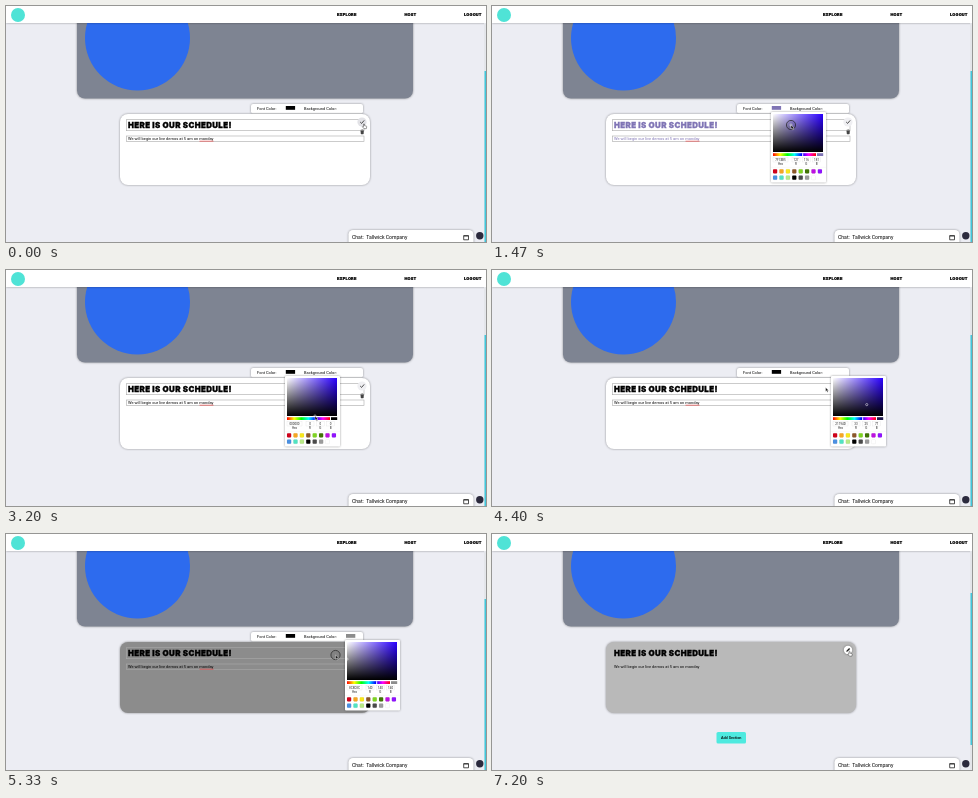
An HTML page that plays this animation: 480x236 px, repeating every 8000 ms.

```html
<!DOCTYPE html>
<html lang="en">
<head>
<meta charset="utf-8">
<title>Schedule editor</title>
<style>
  html, body { margin: 0; width: 100%; height: 100%; overflow: hidden; background: #ecedf3; }
  svg { display: block; width: 100vw; height: 100vh; }
  text { font-family: Roboto, sans-serif; }
  .heavy { font-family: Inter, sans-serif; font-weight: 900; }
  .nav { font-size: 3.9px; letter-spacing: .2px; stroke: #000; stroke-width: .2; }
  .label { font-size: 4px; }
  .raised { filter: drop-shadow(0 .3px 1.3px #0006); }
  .field { fill: none; stroke: #aaa; stroke-width: .6; }
  .line { fill: none; stroke: #222; stroke-width: .8; }
</style>
</head>
<body>
<svg viewBox="0 0 480 236">
  <defs>
    <linearGradient id="white"><stop stop-color="#fff"/><stop offset="1" stop-color="#fff" stop-opacity="0"/></linearGradient>
    <linearGradient id="black" x2="0" y2="1"><stop stop-opacity="0"/><stop offset="1"/></linearGradient>
    <linearGradient id="rainbow"></linearGradient>
  </defs>
  <rect width="480" height="236" fill="#ecedf3"/>

  <rect class="raised" x="71" y="-20" width="336" height="112.5" rx="8" fill="#7e8492"/>
  <circle cx="131.5" cy="32" r="52.5" fill="#2d6bee"/>

  <rect class="raised" width="480" height="17" fill="#fff"/>
  <circle cx="12" cy="9" r="7" fill="#4fe3d6"/>
  <text class="heavy nav" x="331" y="10.1">EXPLORE</text>
  <text class="heavy nav" x="398.5" y="10.1">HOST</text>
  <text class="heavy nav" x="458" y="10.1">LOGOUT</text>

  <g id="toolbar">
    <rect class="raised" x="245" y="98" width="112" height="9.5" rx="2" fill="#fff"/>
    <text class="label" x="251" y="103.8">Font Color:</text>
    <rect id="fontSwatch" x="279.8" y="100" width="9.3" height="3.8"/>
    <text class="label" x="298" y="103.8">Background Color:</text>
    <rect id="backSwatch" x="340" y="100" width="9.3" height="3.8"/>
  </g>

  <rect id="card" class="raised" x="114" y="108" width="250" height="71" rx="8"/>
  <g id="words">
    <text class="heavy" x="122" y="122.3" font-size="7.9" letter-spacing=".38" stroke-width=".3">HERE IS OUR SCHEDULE!</text>
    <text x="122" y="134" font-size="4" stroke="none">We will begin our live demos at 5 am on monday</text>
  </g>
  <g id="editing">
    <rect class="field" x="120.5" y="113.7" width="237.5" height="11"/>
    <rect class="field" x="120.5" y="130" width="237.5" height="5.6"/>
    <path d="M193.5 135.2h14" stroke="#e33" stroke-width=".6"/>
    <circle id="button" cx="356" cy="116" r="4.6"/>
    <path class="line" d="M354.2 116l1.4 1.4 2.6-3"/>
    <path d="M354.4 124.3h3.6M355.5 123.7h1.4M354.8 125h2.8l-.3 3h-2.2z" fill="#444" stroke="#444" stroke-width=".5"/>
  </g>
  <g id="saved">
    <circle class="raised" cx="356" cy="116" r="4.2" fill="#fff"/>
    <path d="M354.2 117.8l.4-1.4 2.5-2.5 1 1-2.5 2.5z" fill="#222"/>
    <rect x="224.5" y="198" width="29.5" height="11.5" rx="1.6" fill="#4eeadf"/>
    <text x="239.2" y="205.2" font-size="3.8" font-weight="500" text-anchor="middle">Add Section</text>
  </g>

  <g id="picker">
    <rect class="raised" x="279" y="106" width="55" height="70.5" rx="1" fill="#fff"/>
    <g id="shadeArea"></g>
    <circle id="selector" r="1.1" fill="none" stroke="#fff" stroke-width=".5"/>
    <rect x="281" y="147.2" width="43" height="2.8" fill="url(#rainbow)"/>
    <rect x="310.2" y="147.2" width="1" height="2.8" fill="#fff"/>
    <rect id="preview" x="325" y="147.2" width="6.2" height="2.8"/>
    <g id="values" font-size="3" text-anchor="middle" fill="#222"></g>
    <g id="presets"></g>
  </g>

  <rect x="478" y="17" width="2" height="219" fill="#e4e6ea"/>
  <rect id="scrollbar" x="478.5" width="1.5" fill="#3fc8dc"/>
  <rect class="raised" x="342.5" y="224" width="125" height="20" rx="4.5" fill="#fff"/>
  <text x="346" y="232.5" font-size="5.1" xml:space="preserve">Chat:  Tallwick Company</text>
  <path class="line" d="M457.7 229.6h4.8v4.2h-4.8zM457.7 230h4.8"/>
  <circle cx="473.8" cy="229.8" r="3.7" fill="#2b2a3d"/>

  <circle id="ring" r="4.6" fill="#0001" stroke="#222" stroke-width=".7"/>
  <path id="arrow" d="M0 0v4.2l1-.9.8 1.6.8-.4-.8-1.5h1.3z" fill="#111" stroke="#fff" stroke-width=".4"/>
  <path id="hand" d="M-.5 0q.5-.6 1 0v1.6l1.8.5q.5.2.4.8l-.4 1.8h-2.3l-1.7-2q.3-.7 1.2 0z" fill="#fff" stroke="#222" stroke-width=".45"/>
</svg>

<script>
const LOOP = 8000, HUE = 250;
const AREA = { x: 281, y: 108, w: 50, h: 38 };
const BACK_OFFSET = 60;
const DEFAULT_SHADE = { s: .675, v: .3 };

// Moments of the interaction, in ms
const FONT_OPEN = 930, FONT_PRESS = 1200, FONT_RELEASE = 3400;
const BACK_OPEN = 3930, BACK_PRESS = 4470, BACK_RELEASE = 5600;
const PICKER_CLOSE = 6400, SAVE = 7070;

const POINTER = [
  [70, 358, 118], [730, 286, 102], [930, 284, 102], [1200, 303, 128], [1470, 299, 119],
  [2130, 291, 113], [2530, 293, 117], [3200, 309, 146], [3470, 309, 146], [3870, 345, 102],
  [3960, 345, 102], [4350, 334, 117], [4470, 333, 118], [5330, 329.5, 121], [5600, 329.5, 119],
  [5800, 329, 119], [6200, 300, 145], [6400, 300, 145], [6930, 357.5, 117.5]
];
const BACK_VALUE = [[4470, .74], [4900, .6], [5330, .55], [5600, .727]];

const $ = id => document.getElementById(id);
const set = (id, attrs) => {
  for (const name in attrs) $(id).setAttribute(name, attrs[name]);
};
const show = (id, visible) => { $(id).style.display = visible ? '' : 'none'; };
const clamp = (x, lo = 0, hi = 1) => Math.min(hi, Math.max(lo, x));

function track(keys, t) {
  const next = keys.findIndex(key => key[0] > t);
  if (next === 0) return keys[0].slice(1);
  if (next < 0) return keys[keys.length - 1].slice(1);
  const a = keys[next - 1], b = keys[next];
  const p = (t - a[0]) / (b[0] - a[0]), eased = p * p * (3 - 2 * p);
  return a.slice(1).map((from, i) => from + (b[i + 1] - from) * eased);
}

function toRgb({ s, v }) {
  return [5, 3, 1].map(n => {
    const k = (n + HUE / 60) % 6;
    return Math.round(255 * v * (1 - s * clamp(Math.min(k, 4 - k))));
  });
}
const toHex = rgb => '#' + rgb.map(c => c.toString(16).padStart(2, '0')).join('').toUpperCase();

function buildPicker() {
  $('rainbow').innerHTML = Array.from({ length: 7 }, (_, i) =>
    `<stop offset="${i / 6}" stop-color="hsl(${i * 60},100%,50%)"/>`).join('');
  $('shadeArea').innerHTML = [`hsl(${HUE},100%,50%)`, 'url(#white)', 'url(#black)'].map(fill =>
    `<rect x="${AREA.x}" y="${AREA.y}" width="${AREA.w}" height="${AREA.h}" fill="${fill}"/>`).join('');
  $('values').innerHTML = ['Hex', 'R', 'G', 'B'].map((label, i) => {
    const x = [288.5, 304, 314.3, 324.6][i], w = i ? 8 : 15;
    return `<rect x="${x - w / 2}" y="151.8" width="${w}" height="4.2" fill="#fff" stroke="#ddd" stroke-width=".3"/>
      <text class="value" x="${x}" y="154.9"></text><text x="${x}" y="159.2">${label}</text>`;
  }).join('');
  const presets = ['#D0021B', '#F5A623', '#F8E71C', '#8B572A', '#7ED321', '#417505', '#BD10E0', '#9013FE',
    '#4A90E2', '#50E3C2', '#B8E986', '#000', '#4A4A4A', '#9B9B9B', '#FFF'];
  $('presets').innerHTML = '<path d="M279 161.3h55" stroke="#eee" stroke-width=".4"/>' + presets.map((fill, i) =>
    `<rect x="${281 + i % 8 * 6.4}" y="${163.2 + (i >> 3) * 6.4}" width="4.2" height="4.2" rx=".8"
      fill="${fill}" stroke="#0003" stroke-width=".2"/>`).join('');
}

function shadeAt(x, y) {
  return { s: clamp((x - AREA.x) / AREA.w), v: clamp(1 - (y - AREA.y) / AREA.h) };
}

function drawPicker(shade, offset) {
  const rgb = toRgb(shade), hex = toHex(rgb);
  set('picker', { transform: `translate(${offset})` });
  set('selector', { cx: AREA.x + shade.s * AREA.w, cy: AREA.y + (1 - shade.v) * AREA.h });
  set('preview', { fill: hex });
  const values = [hex.slice(1), ...rgb];
  document.querySelectorAll('.value').forEach((node, i) => { node.textContent = values[i]; });
}

function draw(t) {
  const [x, y] = track(POINTER, t);
  const saved = t >= SAVE;
  const fontPicked = t >= FONT_PRESS, backPicked = t >= BACK_PRESS;

  const fontShade = fontPicked ? shadeAt(...track(POINTER, Math.min(t, FONT_RELEASE))) : DEFAULT_SHADE;
  const backShade = backPicked ? { s: 0, v: track(BACK_VALUE, t)[0] } : DEFAULT_SHADE;
  const fontColor = fontPicked ? toHex(toRgb(fontShade)) : '#000000';
  const backColor = backPicked ? toHex(toRgb(backShade)) : '#FFFFFF';

  set('words', { fill: fontColor, stroke: fontColor });
  set('fontSwatch', { fill: fontColor });
  set('backSwatch', { fill: backColor });
  set('card', { fill: backColor });

  const onBack = t >= BACK_OPEN;
  drawPicker(onBack ? backShade : fontShade, onBack ? BACK_OFFSET : 0);
  show('picker', t >= FONT_OPEN && t < PICKER_CLOSE);
  show('toolbar', !saved);
  show('editing', !saved);
  show('saved', saved);

  const overButton = Math.hypot(x - 356, y - 116) < 5;
  set('button', { fill: overButton ? '#e2e2e6' : '#efeff2' });
  show('hand', overButton);
  show('arrow', !overButton);
  show('ring', (fontPicked && t < 1730) || (backPicked && t < BACK_RELEASE));
  for (const id of ['hand', 'arrow', 'ring']) set(id, { transform: `translate(${x} ${y})` });
  set('scrollbar', saved ? { y: 59, height: 152 } : { y: 65, height: 171 });
}

buildPicker();
const start = performance.now();
function tick() {
  draw((performance.now() - start) % LOOP);
  requestAnimationFrame(tick);
}
tick();
</script>
</body>
</html>
```
